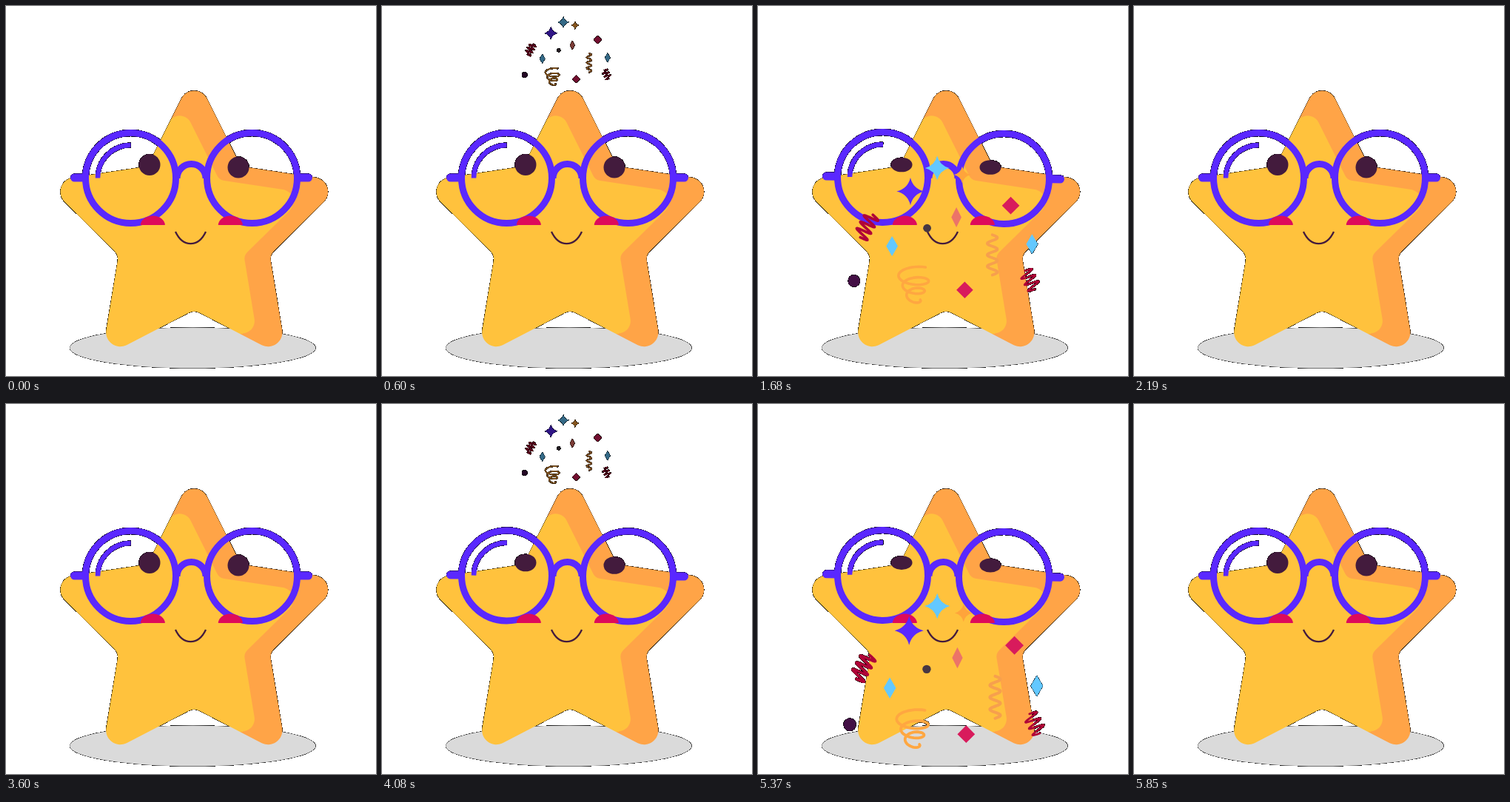
Write an HTML page with a canvas that moves like this. It is 500 by 500 pixels and loops after 6330 ms.

```html
<!DOCTYPE html>
<html lang="en">
<head>
<meta charset="utf-8">
<title>Star with glasses</title>
<style>
html, body { margin: 0; width: 100%; height: 100%; overflow: hidden; background: #fff; }
canvas { display: block; width: 100vw; height: 100vh; }
</style>
</head>
<body>
<canvas id="stage" width="500" height="500"></canvas>
<script>
const SIZE = 500, LOOP = 6330, STEP = 30, TAU = Math.PI * 2;
const ctx = document.getElementById('stage').getContext('2d', { willReadFrequently: true });
const GOLD = '#ffc23d', ORANGE = '#ffa447', PURPLE = '#5a28ff', PLUM = '#431b3d';
const SKY = '#63c8ff', RED = '#d81b5c', WINE = '#b00338', GRAY = '#dadada';

const clamp = v => Math.max(0, Math.min(1, v));
const pulse = (t, mid, half) => clamp(1 - Math.abs(t - mid) / half);

function fill(color) { ctx.fillStyle = color; ctx.fill(); }

function stroke(color, width, cap = 'butt') {
  ctx.strokeStyle = color;
  ctx.lineWidth = width;
  ctx.lineCap = cap;
  ctx.lineJoin = 'round';
  ctx.stroke();
}

function ellipse(x, y, rx, ry, color, from = 0, to = TAU) {
  ctx.beginPath();
  ctx.ellipse(x, y, rx, ry, 0, from, to);
  fill(color);
}

function arc(x, y, r, width, from = 0, to = TAU) {
  ctx.beginPath();
  ctx.arc(x, y, r, from, to);
  stroke(PURPLE, width);
}

function bar(x0, x1, y) {
  ctx.beginPath();
  ctx.moveTo(x0, y);
  ctx.lineTo(x1, y);
  stroke(PURPLE, 11, 'round');
}

// Regular five-pointed star with rounded corners
function star(cx, cy, scale, color) {
  const corner = i => {
    const r = (i % 2 ? 107.5 : 213) * scale, a = i * TAU / 10;
    return [cx + r * Math.sin(a), cy - r * Math.cos(a)];
  };
  const [ax, ay] = corner(0), [bx, by] = corner(9);
  ctx.beginPath();
  ctx.moveTo((ax + bx) / 2, (ay + by) / 2);
  for (let i = 0; i < 10; i++) {
    ctx.arcTo(...corner(i), ...corner(i + 1), (i % 2 ? 15 : 19.4) * scale);
  }
  ctx.closePath();
  fill(color);
}

function body() {
  star(254.3, 303.5, 1, ORANGE);
  ctx.globalCompositeOperation = 'source-atop';
  star(234.6, 309, 0.85, GOLD);
  ctx.fillRect(0, 160, 234, 340);
  ctx.fillRect(200, 345, 120, 98);
  ctx.globalCompositeOperation = 'destination-over';
  ellipse(252.3, 462, 166.3, 27.5, GRAY);
  ctx.globalCompositeOperation = 'source-over';
}

function face(squint) {
  const h = 14.5 * (1 - 0.41 * squint);
  ellipse(194, 214.5, 14.5, h, PLUM);
  ellipse(314, 218, 14.5, h, PLUM);
  ctx.beginPath();
  ctx.moveTo(229, 305);
  ctx.bezierCurveTo(239, 326.5, 260, 326.5, 270, 305);
  stroke(PLUM, 2.3);
}

function glasses(squint) {
  ctx.save();
  ctx.translate(250.5, 232);
  ctx.rotate(0.9 * squint * Math.PI / 180);
  for (const side of [-1, 1]) {
    bar(side * 145, side * 158, 0);
    arc(side * 82, 0.5, 61, 9);
  }
  arc(0, 1, 19.5, 9, Math.PI, TAU);
  arc(-82, 0.5, 44.5, 6.5, Math.PI, Math.PI * 1.5);
  ctx.restore();
}

function curve(steps, point, color, width) {
  ctx.beginPath();
  for (let i = 0; i <= steps; i++) ctx.lineTo(...point(i / steps));
  stroke(color, width, 'round');
}

function sparkle(x, y, r, color) {
  ctx.beginPath();
  ctx.moveTo(x + r, y);
  for (let i = 0; i < 4; i++) {
    const a = i * TAU / 4, b = a + TAU / 8, c = a + TAU / 4, q = r * 0.28;
    ctx.quadraticCurveTo(x + q * Math.cos(b), y + q * Math.sin(b), x + r * Math.cos(c), y + r * Math.sin(c));
  }
  fill(color);
}

function diamond(x, y, w, h, color) {
  ctx.beginPath();
  ctx.moveTo(x, y - h);
  ctx.lineTo(x + w, y);
  ctx.lineTo(x, y + h);
  ctx.lineTo(x - w, y);
  ctx.closePath();
  fill(color);
}

// Wave along the axis (ax, ay), swinging by (dx, dy)
function squiggle(x, y, ax, ay, dx, dy, turns, color, width) {
  curve(70, p => {
    const s = Math.sin(p * turns * TAU);
    return [x + ax * (p - 0.5) + dx * s, y + ay * (p - 0.5) + dy * s];
  }, color, width);
}

function coil(x, y, color, width) {
  curve(90, p => {
    const a = 0.9 + p * 2.9 * TAU, r = 21 - 14 * p;
    return [x + r * Math.cos(a), y - 16 + 34 * p - (8 - 3 * p) * Math.sin(a)];
  }, color, width);
}

// Pieces fall from above while they grow and fade in, then fade out near the ground
function confetti(t) {
  if (t <= 0 || t >= 2070) return;
  const rise = clamp(t / 940), late = Math.max(0, t - 1095);
  const scale = rise + late * 0.00027;
  ctx.save();
  ctx.globalAlpha = rise * clamp((2070 - t) / 240);
  ctx.translate(248.5 + late / 500, 4 + 367.4 * (t / 1785) ** 1.392);
  ctx.scale(scale, scale);
  ctx.translate(-248.5, -170);
  sparkle(210, 115, 16.5, PURPLE);
  sparkle(242, 87, 14.5, SKY);
  sparkle(272, 95, 10, '#ffa43b');
  diamond(330, 132, 10.5, 10.5, RED);
  diamond(275, 233, 10, 10, RED);
  diamond(265, 146, 6, 12, '#ec7468');
  diamond(188, 180.5, 7, 12, SKY);
  diamond(355.5, 178, 7, 12, SKY);
  ellipse(230, 159, 4.8, 4.8, '#473743');
  ellipse(142.5, 222, 7.2, 7.2, '#430f45');
  coil(215, 228, '#ffa741', 3.2);
  squiggle(308, 191, 0, 48, 6, 0, 3.5, '#f7a04d', 3.4);
  squiggle(157.5, 156.5, -15, 27, 7.5, 5, 3.5, WINE, 3.2);
  squiggle(353, 221, 12, 22, 7.5, -4, 3, WINE, 2.3);
  ctx.restore();
}

// Dark matte: soft edges and faded parts blend to black, empty parts stay white
function matte() {
  const image = ctx.getImageData(0, 0, SIZE, SIZE), d = image.data;
  for (let i = 0; i < d.length; i += 4) {
    const a = d[i + 3] / 255;
    for (let c = i; c < i + 3; c++) d[c] = a < 0.04 ? 255 : d[c] * a;
    d[i + 3] = 255;
  }
  ctx.putImageData(image, 0, 0);
}

function draw(t) {
  const second = t >= 3570;
  const blink = second ? t - 3660 : t;
  const squint = pulse(blink, 270, 270) + pulse(blink, 1770, 420);
  ctx.clearRect(0, 0, SIZE, SIZE);
  body();
  face(squint);
  glasses(squint);
  for (const x of [198.3, 303.3]) ellipse(x, 296, 16.5, 12.5, '#de0a5b', Math.PI, TAU);
  confetti(t - (second ? 3585 : 105));
  matte();
}

let shown = -1;
function tick() {
  const t = Math.floor(performance.now() % LOOP / STEP) * STEP;
  if (t !== shown) draw(shown = t);
  requestAnimationFrame(tick);
}
tick();
</script>
</body>
</html>
```
